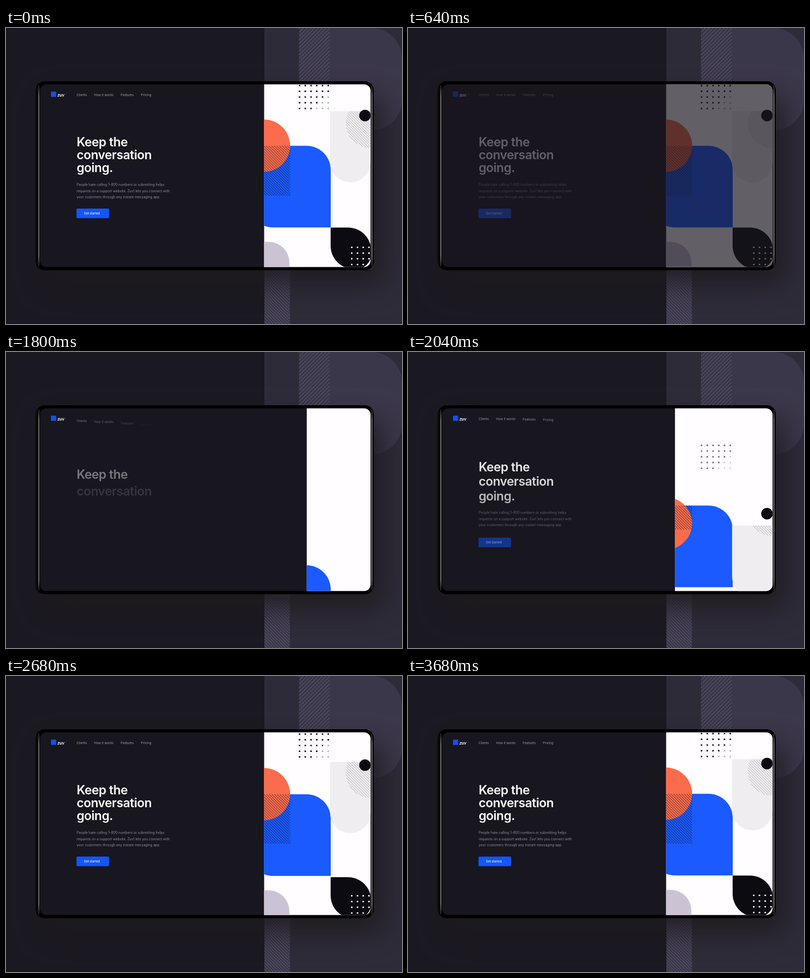
Write an HTML page with a canvas that moves like this. It is 800 px wide and 600 px high and loops after 3.72 s.

```html
<!DOCTYPE html>
<html lang="en">
<head>
<meta charset="utf-8">
<style>
  html, body { margin: 0; width: 100%; height: 100%; overflow: hidden; background: #1a1820; }
  canvas { display: block; }
</style>
</head>
<body>
<canvas width="800" height="600"></canvas>
<script>
const ctx = document.querySelector('canvas').getContext('2d');
const LOOP = 3720, FADE_START = 240, FADE_END = 760;
const SCREEN = '#18161e', BLUE = '#1a5aff', INK = '#0c0b11';

const clamp = v => Math.min(1, Math.max(0, v));
const ramp = (t, start, length) => clamp((t - start) / length);
const easeOut = (t, start, length) => 1 - (1 - ramp(t, start, length)) ** 3;
// Distance still to travel: quintic ease-out, anchored to its value at 2280 ms.
const remaining = (t, at2280, end) => at2280 * (Math.max(0, end - t) / (end - 2280)) ** 5;

function box(x, y, w, h, radii, color) {
  ctx.beginPath();
  ctx.roundRect(x, y, w, h, radii);
  if (color) { ctx.fillStyle = color; ctx.fill(); }
}

function disc(x, y, r, color) {
  ctx.beginPath();
  ctx.arc(x, y, r, 0, 2 * Math.PI);
  ctx.fillStyle = color;
  ctx.fill();
}

function clipped(makePath, paint) {
  ctx.save();
  makePath();
  ctx.clip();
  paint();
  ctx.restore();
}

// 45 degree lines; slope 1 falls to the right, -1 rises.
function hatch(x, y, w, h, step, slope, color, weight) {
  ctx.beginPath();
  for (let i = x - h; i < x + w + h; i += step) {
    ctx.moveTo(i, y);
    ctx.lineTo(i + slope * h, y + h);
  }
  ctx.strokeStyle = color;
  ctx.lineWidth = weight;
  ctx.stroke();
}

function label(text, x, y, font, color, alpha = 1, spacing = 0) {
  ctx.save();
  ctx.globalAlpha = alpha;
  ctx.font = font;
  ctx.letterSpacing = spacing + 'px';
  ctx.fillStyle = color;
  ctx.fillText(text, x, y);
  ctx.restore();
}

function dots(x, y, cols, rows, colorAt) {
  for (let r = 0; r < rows; r++)
    for (let c = 0; c < cols; c++) disc(x + c * 11.6, y + r * 11.6, 1.7, colorAt(r, c));
}

function backdrop() {
  ctx.fillStyle = '#1a1820';
  ctx.fillRect(0, 0, 800, 600);
  ctx.fillStyle = '#2d2b38';
  ctx.fillRect(522, 0, 278, 600);
  box(592, 0, 208, 208, [0, 62, 62, 0], '#3b374a');
  clipped(() => box(592, 0, 62, 120, 0), () => hatch(592, 0, 62, 120, 7.6, -1, '#676379', 1));
  box(522, 480, 51.5, 120, 0, '#3b374a');
  clipped(() => box(522, 480, 51.5, 120, 0), () => hatch(522, 480, 52, 120, 6.2, 1, '#676379', 1));
}

function device() {
  ctx.save();
  ctx.shadowColor = 'rgba(28,25,29,.85)';
  ctx.shadowBlur = 55;
  ctx.shadowOffsetX = 20;
  ctx.shadowOffsetY = 30;
  box(60, 108, 683, 383, 18, '#000');
  ctx.restore();
  box(62, 120, 1, 359, 0, '#222');
  for (const x of [65.4, 738.4]) {
    const shine = ctx.createLinearGradient(0, 116, 0, 484);
    shine.addColorStop(0, '#222');
    shine.addColorStop(.06, '#8c8c8c');
    shine.addColorStop(.94, '#8c8c8c');
    shine.addColorStop(1, '#222');
    box(x, 116, 1.8, 368, 1, shine);
  }
}

function artwork(t) {
  const left = 737 - 215.7 * easeOut(t, 1590, 800);
  if (left >= 737) return;
  clipped(() => box(left, 114, 737 - left, 371, 0), () => {
    ctx.fillStyle = '#fffdff';
    ctx.fillRect(left, 114, 737 - left, 371);

    const lift = remaining(t, 21.5, 3148);
    const blueTop = 238.7 + lift;
    box(490, blueTop, 166, 165.6, [0, 49, 0, 49], BLUE);
    disc(521, 238.5 + remaining(t, 30, 3092), 53, '#fa6c4b');
    const hatchBottom = 340 + remaining(t, 6, 3148);
    if (hatchBottom > blueTop)
      clipped(() => box(521, blueTop, 53, hatchBottom - blueTop, 0),
        () => hatch(521, hatchBottom - 102, 53, 102, 5.3, 1, 'rgba(18,16,32,.8)', 1));
    box(490, 433.5 + lift, 82.5, 90, [0, 42, 0, 0], '#cbc2d3');

    const pillTop = 168.6 + remaining(t, 64.5, 3309);
    box(654.7, pillTop, 82, 144.4, [0, 0, 41, 41], '#f0edf1');
    const roundTop = 143 + remaining(t, 46, 3315);
    clipped(() => box(654.7, pillTop, 82, 144.4, 0), () =>
      clipped(() => box(686.3, roundTop, 100, 100, 50),
        () => hatch(686, roundTop, 52, 100, 5.3, 1, '#9b999e', .8)));
    disc(725.2, 177.5 + remaining(t, 49, 3231), 11.7, INK);

    box(655.8, 404.4 + remaining(t, 37.5, 3339), 82, 84, [0, 47, 30, 47], INK);
    dots(698.5, 444.6 + lift, 4, 4, () => '#fffdff');

    ctx.globalAlpha = ramp(t, 1860, 300);
    dots(593, 116.7 + lift, 6, 5, (r, c) => r + c >= 7 ? '#b0aeb3' : INK);
    ctx.globalAlpha = 1;
  });
}

function copy(t) {
  const logo = ramp(t, 1080, 250);
  ctx.globalAlpha = logo;
  ctx.fillStyle = '#1450e6';
  ctx.fillRect(90.8, 129, 10.6, 10.6);
  ctx.globalAlpha = 1;
  label('zuv', 104, 139, 'italic 700 9.5px Lato, sans-serif', '#fff', logo);
  label('!', 120, 139, 'italic 700 9.5px Lato, sans-serif', '#17389c', logo);

  [['Clients', 142.7], ['How it works', 178], ['Features', 231.8], ['Pricing', 272.6]].forEach(([text, x], i) => {
    const p = easeOut(t, 1600 + i * 60, 600);
    label(text, x, 137.5 + 14 * (1 - p), '400 6.4px Inter, sans-serif', '#a3a2a6', p);
  });

  ['Keep the', 'conversation', 'going.'].forEach((text, i) => {
    const p = easeOut(t, 1700 + i * 72, 600);
    label(text, 142.7, 239.6 + i * 26 + 30 * (1 - p), '600 25px Inter, sans-serif', '#fff', p, -.5);
  });

  const body = easeOut(t, 1880, 600);
  [
    'People hate calling 1-800 numbers or submitting helps',
    'requests on a support website. Zuv! lets you connect with',
    'your customers through any instant messaging app.'
  ].forEach((text, i) =>
    label(text, 142.7, 320.4 + i * 12.5 + 20 * (1 - body), '400 6.9px Inter, sans-serif', '#939297', body));

  const button = easeOut(t, 1920, 600);
  const y = 366 + 20 * (1 - button);
  ctx.globalAlpha = button;
  box(142.4, y, 65.8, 19.5, 2, '#1256ff');
  ctx.globalAlpha = 1;
  label('Get started', 157.4, y + 12.1, '500 6px Inter, sans-serif', '#fff', button);
}

function draw(t) {
  const leaving = t < FADE_END;
  const scene = leaving ? LOOP : t;
  backdrop();
  device();
  clipped(() => box(68.5, 114.2, 668, 370.4, 13), () => {
    ctx.fillStyle = SCREEN;
    ctx.fillRect(60, 108, 683, 383);
    artwork(scene);
    copy(scene);
    if (leaving) {
      ctx.globalAlpha = ramp(t, FADE_START, FADE_END - FADE_START) ** 1.5;
      ctx.fillStyle = SCREEN;
      ctx.fillRect(60, 108, 683, 383);
      ctx.globalAlpha = 1;
    }
  });
}

const start = performance.now();
function frame() {
  draw((performance.now() - start) % LOOP);
  requestAnimationFrame(frame);
}
frame();
</script>
</body>
</html>
```
